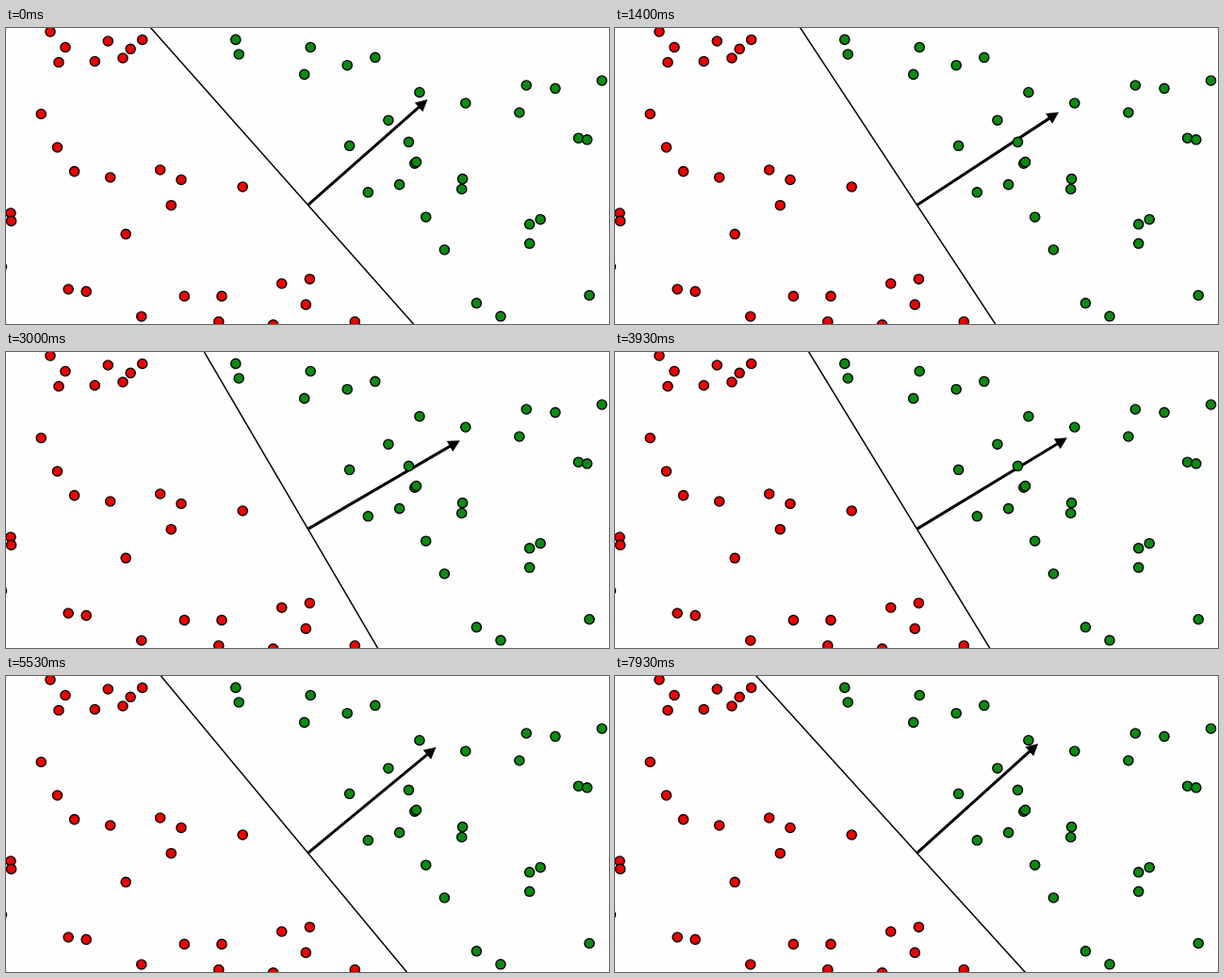
Animation, 640 px wide and 315 px high, one loop 8000 ms. Source, as an HTML page with a canvas:

```html
<!DOCTYPE html>
<html lang="en">
<head>
<meta charset="utf-8">
<title>Separating line</title>
<style>
  html, body { margin: 0; width: 100%; height: 100%; overflow: hidden; background: #fefefe; }
  canvas { display: block; width: 640px; height: 315px; }
</style>
</head>
<body>
<canvas id="stage" width="640" height="315"></canvas>
<script>
const ctx = document.getElementById('stage').getContext('2d');
const LOOP = 8000, STEP = 1000 / 15;
const PIVOT = { x: 320.5, y: 188.4 };
const RED = '#ec0000', GREEN = '#0a8a12';

// The scattered samples; their colour follows from their side of the line.
const SAMPLES = [
  [47, 4], [63, 20.5], [56, 36.5], [94.3, 35.5], [108.3, 14], [124, 32], [132.2, 22.3], [144.7, 12.5],
  [37.3, 91.5], [54.5, 127], [72.6, 152.6], [110.7, 159], [163.7, 151], [186, 161.5], [175.3, 188.7],
  [251.2, 169], [127.2, 219.3], [5, 197], [5.6, 205.4], [-4.6, 254], [66.2, 278], [85.2, 280.4],
  [143.8, 307], [189.4, 285.4], [229, 285.4], [225.8, 312.5], [283.6, 315.8], [292.7, 272],
  [322.4, 267.2], [318.3, 294.4], [370.3, 312.5],
  [243.8, 12.4], [247.2, 28], [323.2, 20.5], [316.7, 49.4], [362.2, 39.7], [391.8, 31.3], [438.9, 68.5],
  [405.9, 98.2], [364.6, 125.3], [427.5, 121.3], [433.8, 144.2], [435.5, 142.6], [417.6, 166.6],
  [384.3, 174.8], [445.7, 201.2], [465.4, 236], [487.8, 80], [484.6, 160.6], [483.7, 171.5],
  [552.3, 61], [583, 64.3], [544.9, 90], [632.5, 56], [607.6, 117.2], [616.8, 118.8],
  [567.2, 203.7], [555.7, 208.8], [555.7, 229.3], [619.2, 284.5], [499.4, 292.8], [525, 306.8]
];

const radians = deg => deg * Math.PI / 180;
const easeOut = u => 1 - Math.max(0, 1 - u) ** 2;
// Slow start, then settling towards 1.
const settle = u => 1 - Math.exp(-(Math.max(0, u) ** 2.23));

// The arrow tilts down and grows, then swings back and shrinks.
function pose(t) {
  const back = settle((t - 3.3) / 1.837);
  return {
    angle: radians(41.5 - 11.2 * easeOut(t / 2.9) + 11.85 * back),
    length: 169.5 + 18.5 * easeOut(t / 4) - 14.5 * back
  };
}

function sideColor(x, y) {
  const a = radians(36);
  const side = (x - PIVOT.x) * Math.cos(a) - (y - PIVOT.y) * Math.sin(a);
  return side > 0 ? GREEN : RED;
}

function stroke(x1, y1, x2, y2, width) {
  ctx.lineWidth = width;
  ctx.beginPath();
  ctx.moveTo(x1, y1);
  ctx.lineTo(x2, y2);
  ctx.stroke();
}

function dot(x, y) {
  ctx.fillStyle = sideColor(x, y);
  ctx.lineWidth = 1.4;
  ctx.beginPath();
  ctx.arc(x, y, 5.1, 0, Math.PI * 2);
  ctx.fill();
  ctx.stroke();
}

function arrow(length) {
  stroke(0, 0, length - 8, 0, 3);
  ctx.fillStyle = '#000';
  ctx.beginPath();
  ctx.moveTo(length, 0);
  ctx.lineTo(length - 12.5, -6.5);
  ctx.lineTo(length - 12.5, 6.5);
  ctx.fill();
}

function draw(ms) {
  const frame = Math.floor(((ms + 4) % LOOP) / STEP);
  const { angle, length } = pose(frame * STEP / 1000);
  ctx.fillStyle = '#fefefe';
  ctx.fillRect(0, 0, 640, 315);
  ctx.strokeStyle = '#000';

  ctx.save();
  ctx.translate(PIVOT.x, PIVOT.y);
  ctx.rotate(-angle);
  stroke(0, -400, 0, 400, 1.5);
  arrow(length);
  ctx.restore();

  for (const [x, y] of SAMPLES) dot(x, y);
}

const start = performance.now();
function tick() {
  draw(performance.now() - start);
  requestAnimationFrame(tick);
}
tick();
</script>
</body>
</html>
```
